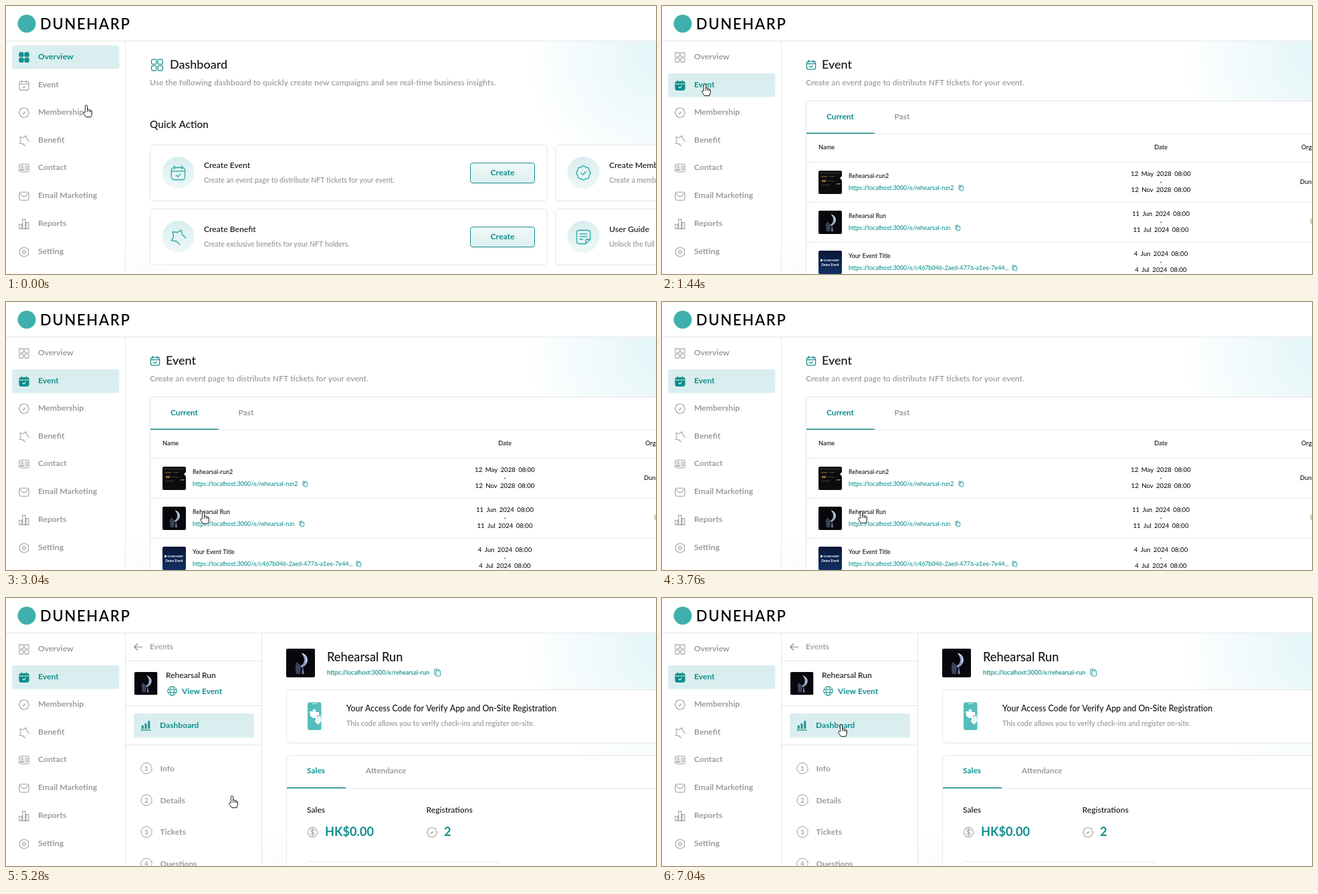
Recreate the animation shown at these times as an HTML page with a canvas. Size 972 by 402 pixels, loop 7440 ms.

```html
<!DOCTYPE html>
<html lang="en">
<head>
<meta charset="utf-8">
<title>Dashboard tour</title>
<style>
html, body { margin: 0; width: 100%; height: 100%; overflow: hidden; background: #fff; }
canvas { display: block; width: 100vw; height: 100vh; }
</style>
</head>
<body>
<canvas id="stage" width="972" height="402"></canvas>
<script>
const W = 972, H = 402, LOOP = 7440, STEP = 80;
const EVENT_AT = 880, DETAIL_AT = 4960;
const TEAL = '#0f8f8d', MINT = '#3fb0ae', GRAY = '#9c9ca0', INK = '#141414';
const LINE = '#e4e5e6', TINT = '#daeeef';
const BRAND = 'DUNEHARP', EVENT = 'Rehearsal Run', BASE = 'https://localhost:3000/e/';
const ctx = document.getElementById('stage').getContext('2d');

// Text: y is the middle of the capitals
function text(str, x, y, size, color, weight = 500, align = 'left', gap = 0, words = 0) {
  ctx.font = `${weight} ${size}px Lato, "Open Sans", sans-serif`;
  ctx.textAlign = align;
  ctx.letterSpacing = gap + 'px';
  ctx.wordSpacing = words + 'px';
  ctx.fillStyle = color;
  ctx.fillText(str, x, y + size * 0.36);
}

function box(x, y, w, h, r, fill, stroke) {
  ctx.beginPath();
  ctx.roundRect(x, y, w, h, r);
  paint(fill, stroke);
}

function disc(x, y, r, fill, stroke) {
  ctx.beginPath();
  ctx.arc(x, y, r, 0, 7);
  paint(fill, stroke);
}

function paint(fill, stroke) {
  if (fill) { ctx.fillStyle = fill; ctx.fill(); }
  if (stroke) { ctx.strokeStyle = stroke; ctx.stroke(); }
}

function poly(points, fill, stroke, close = true) {
  ctx.beginPath();
  points.forEach(([x, y]) => ctx.lineTo(x, y));
  if (close) ctx.closePath();
  paint(fill, stroke);
}

function path(d, fill, stroke) {
  const p = new Path2D(d);
  if (fill) { ctx.fillStyle = fill; ctx.fill(p); }
  if (stroke) { ctx.strokeStyle = stroke; ctx.stroke(p); }
}

function rule(x, y, w, h = 1, color = LINE) {
  ctx.fillStyle = color;
  ctx.fillRect(x, y, w, h);
}

function fade(y0, y1, top, bottom) {
  const g = ctx.createLinearGradient(0, y0, 0, y1);
  g.addColorStop(0, top);
  g.addColorStop(1, bottom);
  return g;
}

function glow(x, y, r, color) {
  const g = ctx.createRadialGradient(x, y, 0, x, y, r);
  g.addColorStop(0, color);
  g.addColorStop(1, '#ffffff');
  ctx.fillStyle = g;
  ctx.fillRect(x - r, y - r, 2 * r, 2 * r);
}

function ring(n, radius, turn = 0) {
  return Array.from({ length: n }, (_, i) => {
    const a = i * 2 * Math.PI / n - Math.PI / 2 + turn, r = radius(i);
    return [r * Math.cos(a), r * Math.sin(a)];
  });
}

// Icons on a 16 px grid around the origin
const icons = {
  grid(c, on) {
    for (const x of [-7.5, 1]) for (const y of [-7.5, 1]) box(x, y, 6.5, 6.5, 1.5, on && c, c);
  },
  calendar(c, on) {
    box(-7.5, -6, 15, 13.5, 3, on && c, c);
    path('M-4-8v3.5M4-8v3.5', null, c);
    path('M-7.5-2h15', null, on ? TINT : c);
    path('M-2 2.6l1.6 1.6 2.7-2.8', null, on ? '#fff' : c);
  },
  badge(c) {
    poly(ring(16, i => i % 2 ? 7 : 8), null, c);
    path('M-2.5 .2l1.8 1.8 3.3-3.4', null, c);
  },
  // Star with a gap at its lower right notch
  star(c) {
    const p = ring(10, i => i % 2 ? 5.2 : 8.4, 0.43);
    poly([...p.slice(4), ...p.slice(0, 3)], null, c, false);
    disc(...p[3], 0.4, c);
  },
  card(c) {
    box(-7.5, -6, 15, 12, 2, null, c);
    disc(-3, -1.8, 1.6, null, c);
    path('M-6 3.5q3-4 6 0zM2-2.5h3.5M2 0h3.5M2 2.5h3.5', null, c);
  },
  mail(c) {
    box(-7.5, -6, 15, 12.5, 2.5, null, c);
    path('M-7-3.5L0 1.5 7-3.5', null, c);
  },
  bars(c) {
    path('M-7.5 7.5v-7h4v7zM-2.2 7.5v-15h4.2v15zM3.2 7.5v-10h4v10zM-8 7.5h16', null, c);
  },
  hex(c) {
    poly(ring(6, () => 8), null, c);
    disc(0, 0, 2.4, null, c);
  },
  note(c) {
    path('M-4.5-7.5h9q3 0 3 3v7l-5 5h-7q-3 0-3-3v-9q0-3 3-3zM7.5 2.5h-3q-2 0-2 2v3M-4-3.5h8M-4-.5h8M-4 2.5h3', null, c);
  },
  chart(c) {
    rule(-6.5, 0, 3, 5.5, c);
    rule(-1.5, -3, 3, 8.5, c);
    rule(3.5, -7, 3, 12.5, c);
    rule(-8, 6.8, 16, 1.3, c);
  },
  globe(c) {
    disc(0, 0, 7.5, null, c);
    ctx.beginPath();
    ctx.ellipse(0, 0, 3.4, 7.5, 0, 0, 7);
    paint(null, c);
    path('M-7-2.5H7M-7 2.5H7', null, c);
  },
  copy(c) {
    box(-4.5, -7, 9, 11, 1, null, c);
    box(-1.5, -4, 9, 11, 1, '#fff', c);
  },
  dollar(c) {
    disc(0, 0, 7.5, null, c);
    path('M2.6-2.3q-.6-1.5-2.6-1.5-2.4 0-2.4 1.8 0 1.6 2.4 2t2.4 2q0 1.8-2.4 1.8-2.2 0-2.7-1.5M0-5.3V5.3', null, c);
  },
  back(c) {
    path('M8 0H-7M-1.5-6L-7.5 0l6 6', null, c);
  }
};

function icon(name, x, y, color, scale = 1, on = false, weight = 1.1) {
  ctx.save();
  ctx.translate(x, y);
  ctx.scale(scale, scale);
  ctx.lineWidth = weight;
  ctx.lineJoin = ctx.lineCap = 'round';
  icons[name](color, on);
  ctx.restore();
}

const menu = [
  ['Overview', 'grid', 76], ['Event', 'calendar', 118], ['Membership', 'badge', 159],
  ['Benefit', 'star', 201], ['Contact', 'card', 242], ['Email Marketing', 'mail', 284],
  ['Reports', 'bars', 326], ['Setting', 'hex', 368]
];

function frame(active, left) {
  ctx.fillStyle = '#fff';
  ctx.fillRect(0, 0, W, H);
  glow(980, 68, 205, '#e2f5f8');
  glow(left + 25, 412, 60, '#fafbfb');
  ctx.fillStyle = '#fff';
  ctx.fillRect(0, 0, W, 52);
  ctx.fillRect(0, 53, left, H);
  rule(0, 52, W);
  rule(178, 53, 1, H);
  disc(31, 26.5, 13.5, MINT);
  text(BRAND, 51, 27.5, 22, '#0b0b0b', 600, 'left', 1.7);
  menu.forEach(([label, name, y], i) => {
    const on = i === active, color = on ? TEAL : GRAY;
    if (on) box(9, y - 17, 160.5, 35.5, 4, TINT);
    icon(name, 27, y + 1, color, 0.95, on);
    text(label, 48, y, 12.2, color, 700);
  });
}

function action(x, y, name, title, info) {
  box(x + 0.5, y + 0.5, 594, 84, 5, '#fff', LINE);
  disc(x + 42.5, y + 42, 24, fade(y + 18, y + 66, '#d8eeee', '#eff8f8'));
  icon(name, x + 42.5, y + 42.5, MINT, 1.35, false, 1.15);
  text(title, x + 81, y + 30.5, 12.2, INK);
  text(info, x + 81, y + 53, 10.5, GRAY, 600);
  if (x > 800) return;
  box(x + 479.5, y + 27.5, 96, 30, 3, fade(y + 27, y + 58, '#f0f8f8', '#ddf0f0'), TEAL);
  text('Create', x + 527.5, y + 41.5, 12.2, TEAL, 700, 'center');
}

function dashboard() {
  frame(0, 179);
  icon('grid', 226, 88.5, TEAL, 1.12);
  text('Dashboard', 245, 87.5, 18, INK);
  text('Use the following dashboard to quickly create new campaigns and see real-time business insights.', 215, 115, 12.05, GRAY, 600);
  text('Quick Action', 215, 177.5, 15.3, INK);
  action(215, 208, 'calendar', 'Create Event', 'Create an event page to distribute NFT tickets for your event.');
  action(215, 304, 'star', 'Create Benefit', 'Create exclusive benefits for your NFT holders.');
  action(821, 208, 'badge', 'Create Membership', 'Create a membership for your fans.');
  action(821, 304, 'note', 'User Guide', 'Unlock the full potential of your page.');
}

// Small cover pictures, drawn on a 35 px square
const covers = [
  () => {
    rule(0, 0, 35, 35, '#0c0c0e');
    rule(2, 3, 31, 1, '#35353a');
    rule(4, 8, 9, 1.5, '#6a5330');
    rule(16, 8, 8, 1, '#4c4c50');
    rule(5, 14, 6, 3, '#a9682a');
    rule(14, 15, 10, 1, '#45454a');
    rule(4, 21, 14, 1, '#3c3c40');
    rule(27, 19, 6, 1.5, '#77777c');
    path('M35 8l-3 3 3 4z', '#e8e8e8');
  },
  () => {
    rule(0, 0, 35, 35, '#07080c');
    path('M18 5Q29 9 25 18 21 25 13 22 22 21 22 14 22 9 18 5z', '#8f9fc6');
    path('M20 6q7 4 4 11', null, '#e6ebf5');
    path('M13 16l5 5-1 10h-5l-1-10z', '#39425c');
    path('M20 21l2 10h-3z', '#79849c');
  },
  () => {
    rule(0, 0, 35, 35, fade(0, 35, '#0a1638', '#123064'));
    disc(4.5, 14.5, 1.8, '#e9f3f6');
    text(BRAND, 7.5, 14.5, 4.2, '#fff', 700);
    text('Demo Event', 17.5, 21.5, 4.8, '#fff', 700, 'center');
  }
];

function cover(i, x, y, size = 35) {
  ctx.save();
  ctx.beginPath();
  ctx.roundRect(x, y, size, size, 2);
  ctx.clip();
  ctx.translate(x, y);
  ctx.scale(size / 35, size / 35);
  ctx.lineWidth = 1;
  covers[i]();
  ctx.restore();
}

const rows = [
  ['Rehearsal-run2', 'rehearsal-run2', 447, '12 May 2028', '12 Nov 2028'],
  [EVENT, 'rehearsal-run', 442, '11 Jun 2024', '11 Jul 2024'],
  ['Your Event Title', 'c467b046-2aed-4776-a1ee-7e44...', 527, '4 Jun 2024', '4 Jul 2024']
];

function eventList() {
  frame(1, 179);
  icon('calendar', 223, 88.5, TEAL, 0.88, false, 1.4);
  text('Event', 239, 87.5, 18, INK);
  text('Create an event page to distribute NFT tickets for your event.', 215, 115, 12.05, GRAY, 600);
  box(215.5, 142.5, 800, 300, 5, '#fff', LINE);
  text('Current', 246, 166, 12, TEAL, 700);
  text('Past', 347.5, 166, 12, GRAY, 700);
  rule(216, 191, W);
  rule(216, 190, 101.5, 1.5, TEAL);
  text('Name', 234, 212, 9.3, INK);
  text('Date', 746, 212, 9.3, INK, 500, 'center');
  text('Organizer', 956, 212, 9.3, INK);
  rows.forEach(([name, slug, copyX, from, to], i) => {
    const y = 234 + i * 60;
    rule(216, y, W);
    cover(i, 234, y + 13);
    text(name, 279, y + 21, 9, INK);
    text(BASE + slug, 279, y + 39, 9, TEAL);
    icon('copy', copyX - 0.5, y + 39, TEAL, 0.55, false, 1.5);
    text(from + ' 08:00', 746, y + 18, 9.6, INK, 500, 'center', 0, 2);
    text('-', 746, y + 30, 9.6, INK, 500, 'center');
    text(to + ' 08:00', 746, y + 41.5, 9.6, INK, 500, 'center', 0, 2);
  });
  text('Duneharp', 954, 264, 9.3, INK);
  disc(975, 323, 5, '#f1ecc4', '#a8a05a');
}

function phone() {
  box(451, 156.5, 20.5, 41.5, 2.5, '#55bdbb');
  rule(458, 158, 7, 1, '#d8f0f0');
  path('M454 170h5v-3h4v4h5v5h-3v4h-6l-4-3z', '#fff');
  path('M463 179l7-3 2 8-5 6-5-4z', '#e8f6f6');
}

function detail() {
  frame(1, 382);
  rule(178, 53, 1, H);
  rule(382, 53, 1, H);
  [94, 161, 220].forEach(y => rule(179, y, 203));
  icon('back', 197.5, 73.5, '#85858a', 0.75, false, 1.6);
  text('Events', 215, 73, 11.9, GRAY, 600);
  cover(1, 192, 111, 34.5);
  text(EVENT, 239, 115.5, 12, INK);
  icon('globe', 248.5, 139.5, TEAL, 0.9);
  text('View Event', 263, 139.5, 11.9, TEAL, 700);
  box(191, 173, 180, 36.5, 4, TINT);
  icon('chart', 209, 191, TEAL, 0.95);
  text('Dashboard', 230, 190.5, 12.1, TEAL, 700);
  ['Info', 'Details', 'Tickets', 'Questions'].forEach((label, i) => {
    const y = 255.5 + i * 47.7;
    disc(210, y, 8.2, null, GRAY);
    text(i + 1, 210, y, 10, GRAY, 600, 'center');
    text(label, 230.5, y, 12.1, GRAY, 700);
  });

  cover(1, 419, 76, 43);
  text(EVENT, 480, 88, 18.2, INK);
  text(BASE + 'rehearsal-run', 480, 112, 9, TEAL, 600);
  icon('copy', 644, 112, TEAL, 0.72, false, 1.3);
  box(419.5, 137.5, 600, 80, 5, '#fff', LINE);
  phone();
  text('Your Access Code for Verify App and On-Site Registration', 509, 166, 12.4, INK);
  text('This code allows you to verify check-ins and register on-site.', 509, 188.5, 10.6, GRAY, 600);
  box(419.5, 236.5, 600, 300, 5, '#fff', LINE);
  text('Sales', 450, 259, 11.9, TEAL, 700);
  text('Attendance', 538, 259, 11.9, GRAY, 700);
  rule(420, 285, W);
  rule(420, 284, 88, 1.5, TEAL);
  text('Sales', 450, 317.5, 12.1, INK);
  text('Registrations', 628.5, 317.5, 12.1, INK);
  icon('dollar', 458.5, 351.5, GRAY, 0.95);
  text('HK$0.00', 477, 350.5, 18.2, TEAL, 700);
  icon('badge', 637, 351.5, GRAY, 0.95);
  text('2', 655, 350.5, 18.2, TEAL, 700);
  box(449.5, 395.5, 286, 60, 4, '#fff', LINE);
}

// Pointer tip: time, x, y
const route = [
  [0, 120, 149], [480, 64, 116], [1440, 64, 117], [2160, 262, 296], [3040, 295, 315],
  [3760, 298, 314], [4320, 299, 314], [4800, 305, 312], [4960, 305, 312],
  [5280, 338, 297], [5680, 337, 289], [6480, 269, 191], [6800, 268, 190], [LOOP, 268, 190]
];

function pointerAt(t) {
  const i = Math.max(1, route.findIndex(k => k[0] > t));
  const [t0, x0, y0] = route[i - 1], [t1, x1, y1] = route[i];
  const u = (t - t0) / (t1 - t0), e = u * u * (3 - 2 * u);
  return [x0 + (x1 - x0) * e, y0 + (y1 - y0) * e];
}

const HAND = 'M-1.6 10.5V1.4Q-1.6-.2 0-.2T1.6 1.4V6q2.2-.8 2.7.7 2-.5 2.4 1 1.7-.2 1.7 1.6v3.6L7 17.6H-.4L-4 12.3q-.7-1.6.4-2.2 1-.4 2 .4z';
const ARROW = 'M0 0V12.2L2.8 9.6 5 14.8 7.1 13.9 4.9 8.8H8.6z';

function pointer(t) {
  const arrow = t >= 800 && t < 1200;
  ctx.save();
  ctx.translate(...pointerAt(t));
  ctx.lineWidth = 1;
  ctx.lineJoin = 'round';
  path(arrow ? ARROW : HAND, '#fff', '#1c1c1c');
  if (!arrow) path('M1.6 6v4M4.3 6.8V10M6.7 7.9V10.4', null, '#1c1c1c');
  ctx.restore();
}

function draw(now) {
  const t = Math.floor(now % LOOP / STEP) * STEP;
  ctx.lineWidth = 1;
  if (t < EVENT_AT) dashboard();
  else if (t < DETAIL_AT) eventList();
  else detail();
  pointer(t);
}

let start;
function tick(now) {
  start ??= now;
  draw(Math.max(0, now - start));
  requestAnimationFrame(tick);
}
draw(0);
requestAnimationFrame(tick);
</script>
</body>
</html>
```
